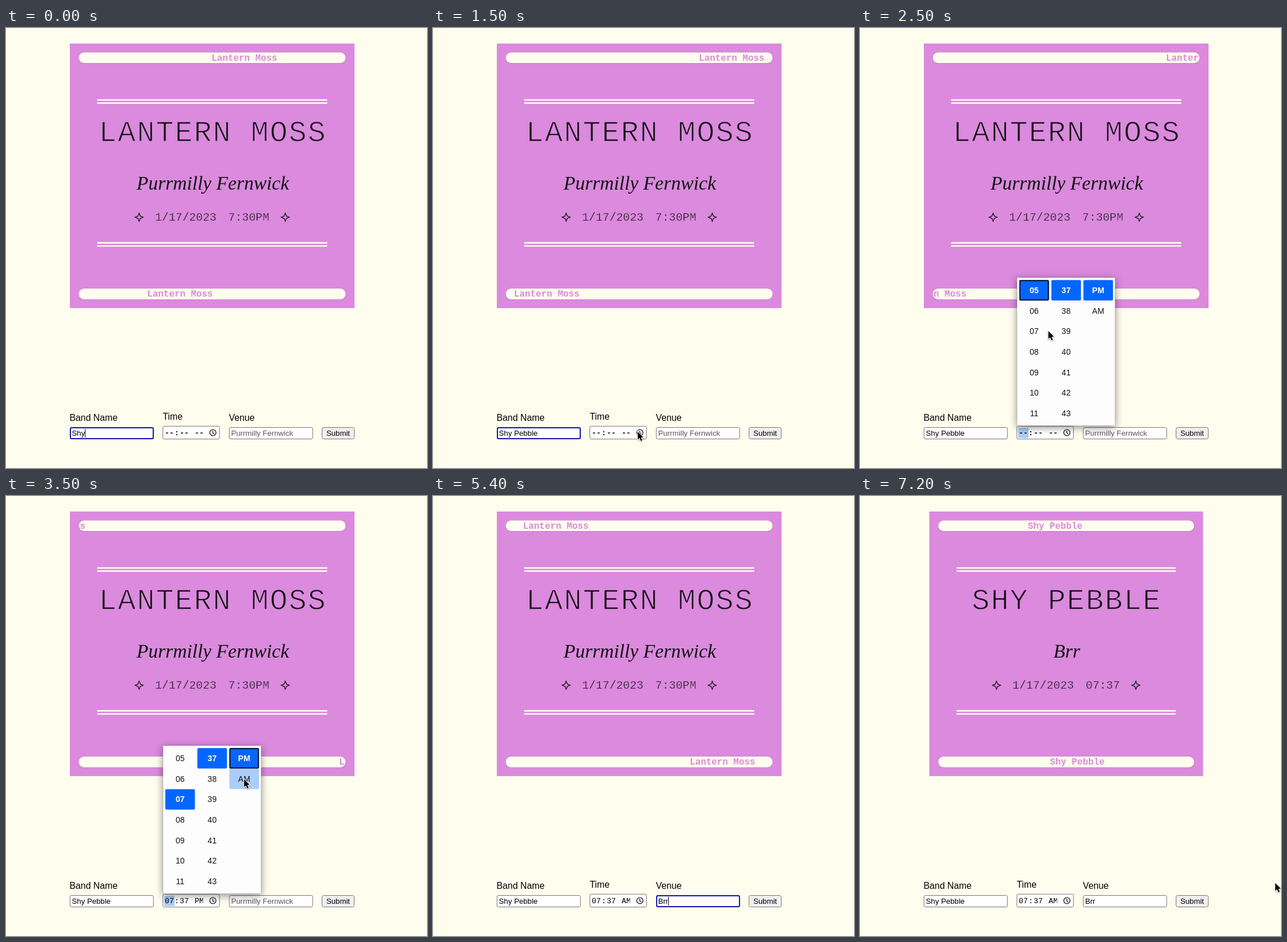
An HTML page with a canvas for the animation above (7.3 s loop, 732 by 765 pixels).

```html
<!DOCTYPE html>
<html lang="en">
<head>
<meta charset="utf-8">
<title>Gig poster form</title>
<style>
  html, body { margin: 0; width: 100%; height: 100%; overflow: hidden; background: #fffdee; }
  canvas { display: block; }
</style>
</head>
<body>
<canvas id="stage" width="732" height="765"></canvas>
<script>
const ctx = document.getElementById('stage').getContext('2d');

const LOOP = 7300, STEP = 100, CENTER = 358.5;
const IVORY = '#fffdee', PLUM = '#db8ade', INK = '#111', GREY = '#767676';
const BLUE = '#0566ff', PALE = '#acccf8', FOCUS = '#1016b0';
const SANS = '"Liberation Sans", Arial, sans-serif';
const MONO = '"Liberation Mono", "Courier New", monospace';
const SCRIPT = '"Liberation Serif", "Times New Roman", serif';

const OLD_BAND = 'Lantern Moss', NEW_BAND = 'Shy Pebble';
const OLD_VENUE = 'Purrmilly Fernwick', NEW_VENUE = 'Brr';

// Moments of the interaction, in ms
const AT = { open: 1800, hour: 2800, meridiem: 3200, am: 3700, close: 4300,
             venue: 4900, press: 6100, submit: 6300 };

const CURSOR = [
  [[1000, 200, 735], [1500, 356, 702], [1800, 358, 703], [2500, 327.5, 527],
   [2800, 306, 529], [2900, 306, 529], [3200, 410, 466], [3500, 414, 492.5],
   [3800, 414, 492.5], [4300, 420, 706], [4600, 423, 709.5], [4800, 423, 709.5]],
  [[5700, 430, 711], [6200, 586, 713.5], [6400, 586, 713.5], [7200, 722, 673]]
];

const mod = (a, n) => ((a % n) + n) % n;

function text(str, x, y, font, color = '#000', align = 'left') {
  ctx.font = font;
  ctx.fillStyle = color;
  ctx.textAlign = align;
  ctx.fillText(str, x, y);
}

// Light type: the card colour trims the edges of the glyphs
function thinText(str, x, y, font, trim, align) {
  text(str, x, y, font, INK, align);
  ctx.strokeStyle = PLUM;
  ctx.lineWidth = trim;
  ctx.lineJoin = 'round';
  ctx.strokeText(str, x, y);
}

function box(x, y, w, h, r, fill, stroke, lineWidth = 1) {
  ctx.beginPath();
  ctx.roundRect(x, y, w, h, r);
  if (fill) {
    ctx.fillStyle = fill;
    ctx.fill();
  }
  if (stroke) {
    ctx.strokeStyle = stroke;
    ctx.lineWidth = lineWidth;
    ctx.stroke();
  }
}

function withShadow(color, blur, dy, draw) {
  ctx.save();
  ctx.shadowColor = color;
  ctx.shadowBlur = blur;
  ctx.shadowOffsetY = dy;
  draw();
  ctx.restore();
}

function cursorAt(t) {
  const path = CURSOR.find(p => t >= p[0][0] && t <= p[p.length - 1][0]);
  if (!path) return null;
  const i = Math.max(1, path.findIndex(k => k[0] >= t));
  const [t0, x0, y0] = path[i - 1], [t1, x1, y1] = path[i];
  const u = (t - t0) / (t1 - t0), e = u * u * (3 - 2 * u);
  return { x: x0 + (x1 - x0) * e, y: y0 + (y1 - y0) * e };
}

function marquee(left, width, y, offset, label) {
  withShadow('rgba(0,0,0,.2)', 1.5, 0.3, () => box(left, y, width, 18.7, 9.35, IVORY));
  ctx.save();
  ctx.beginPath();
  ctx.roundRect(left, y, width, 18.7, 9.35);
  ctx.clip();
  text(label, left + offset, y + 14.1, `bold 15.83px ${MONO}`, PLUM);
  ctx.restore();
}

function doubleRule(x, y, w) {
  ctx.fillStyle = IVORY;
  ctx.fillRect(x, y, w, 2.6);
  ctx.fillRect(x, y + 5.4, w, 2.6);
}

function sparkle(x, y) {
  ctx.beginPath();
  for (let i = 0; i < 8; i++) {
    const r = i % 2 ? 2.9 : 7, a = i * Math.PI / 4;
    ctx.lineTo(x + r * Math.cos(a), y + r * Math.sin(a));
  }
  ctx.closePath();
  ctx.strokeStyle = INK;
  ctx.lineWidth = 1.3;
  ctx.lineJoin = 'miter';
  ctx.stroke();
}

function drawCard(t) {
  const done = t >= AT.submit;
  const band = done ? NEW_BAND : OLD_BAND;
  const width = done ? 476 : 495;
  const left = CENTER - width / 2;
  box(left, 27, width, 460, 0, PLUM);

  const travel = 577.8, lead = 113.8, shift = t * 0.0698;
  marquee(left + 15.5, width - 31, 42.4, mod(231 + shift + lead, travel) - lead, band);
  marquee(left + 15.5, width - 31, 453, mod(119 - shift + lead, travel) - lead, band);

  doubleRule(left + 47.5, 123.8, width - 95);
  doubleRule(left + 47.5, 372.2, width - 95);

  ctx.letterSpacing = '1.8px';
  thinText(band.toUpperCase(), CENTER + 0.9, 196.5, `52px ${MONO}`, 1.5, 'center');
  ctx.letterSpacing = '0px';

  text(done ? NEW_VENUE : OLD_VENUE, CENTER + 1, 280.5, `italic 33.5px ${SCRIPT}`, INK, 'center');

  const date = '1/17/2023', time = done ? '07:37' : '7:30PM';
  const pitch = 11.88, gap = 20.5;
  const total = (date.length + time.length) * pitch + gap;
  const start = CENTER - total / 2;
  const font = `19.8px ${MONO}`;
  thinText(date, start, 335, font, 0.5, 'left');
  thinText(time, start + date.length * pitch + gap, 335, font, 0.5, 'left');
  sparkle(start - 27.7, 329);
  sparkle(start + total + 27.7, 329);
}

function drawInput(x, value, placeholder, focused, caret) {
  if (focused) box(x + 0.7, 695, 144, 19, 2, '#fff', FOCUS, 2);
  else box(x, 694.5, 145, 20, 2.5, '#fff', GREY);
  const font = `13.2px ${SANS}`;
  text(value || placeholder, x + 3.2, 709, font, value ? '#000' : '#585858');
  if (caret) {
    ctx.fillStyle = '#000';
    ctx.fillRect(x + 3.2 + (value ? ctx.measureText(value).width : 0), 697, 1, 15);
  }
}

function drawTimeField(t) {
  const filled = t >= AT.hour;
  box(272.8, 692.3, 98.4, 22.4, 2.5, '#fff', GREY);
  if (t >= AT.open && t < AT.close) {
    ctx.fillStyle = PALE;
    ctx.fillRect(275, 695, 18, 18);
  }
  const parts = filled ? ['07', '37', t >= AT.am ? 'AM' : 'PM'] : ['--', '--', '--'];
  const font = `${filled ? '' : 'bold '}13.2px ${MONO}`;
  ctx.save();
  ctx.beginPath();
  ctx.rect(273, 692, 69.5, 23);
  ctx.clip();
  [276, 302, 328].forEach((x, i) => text(parts[i], x, 708, font));
  text(':', 293, 708, font);
  ctx.restore();

  ctx.strokeStyle = '#222';
  ctx.lineWidth = 1.4;
  ctx.beginPath();
  ctx.arc(359.7, 703.5, 5.4, 0, Math.PI * 2);
  ctx.moveTo(359.5, 700);
  ctx.lineTo(359.5, 704);
  ctx.lineTo(362.3, 705.6);
  ctx.stroke();
}

function drawForm(t) {
  const label = `15.84px ${SANS}`;
  text('Band Name', 110.5, 682.5, label);
  text('Time', 272.5, 680.5, label);
  text('Venue', 387.5, 682.5, label);

  const typed = Math.min(NEW_BAND.length, 3 + Math.floor(t / 125));
  const bandFocus = t < AT.open;
  drawInput(111.3, NEW_BAND.slice(0, typed), '', bandFocus, bandFocus && t < 1400);

  drawTimeField(t);

  const venueFocus = t >= AT.close && t < AT.press;
  const letters = t < AT.venue ? 0 : Math.min(3, 1 + Math.floor((t - AT.venue) / 200));
  const caretOn = venueFocus && t < 5800;
  drawInput(388.2, NEW_VENUE.slice(0, letters), OLD_VENUE, venueFocus, caretOn);

  const pressed = t >= AT.press && t < AT.submit;
  box(549.5, 694.5, 56, 20, 3, pressed ? '#f6f6f6' : '#efefef', GREY);
  text('Submit', 577.5, 709, `13.2px ${SANS}`, '#000', 'center');
}

function drawPicker(t, cursor) {
  withShadow('rgba(0,0,0,.45)', 14, 3, () => box(273, 434, 170.5, 257.5, 1, '#fdfdfd'));
  box(273, 434, 170.5, 257.5, 1, null, 'rgba(0,0,0,.15)');

  const columns = [
    { start: 5, count: 7, selected: t >= AT.hour ? 2 : 0 },
    { start: 37, count: 7, selected: 0 },
    { names: ['PM', 'AM'], count: 2, selected: t >= AT.am ? 1 : 0 }
  ];
  const active = t >= AT.meridiem ? 2 : 0;
  columns.forEach((col, c) => {
    const x = 277 + c * 55.7;
    for (let row = 0; row < col.count; row++) {
      const y = 438.3 + row * 35.67;
      const selected = row === col.selected;
      const hover = cursor && cursor.x > x && cursor.x < x + 50 &&
                    cursor.y > y && cursor.y < y + 35.5;
      if (selected) box(x, y, 51.5, 35.5, 2, BLUE);
      else if (hover) box(x, y, 51.5, 35.5, 2, PALE);
      if (selected && c === active) box(x + 1, y + 1, 49.5, 33.5, 1, null, '#0a1430', 2);
      const name = col.names ? col.names[row] : String(col.start + row).padStart(2, '0');
      text(name, x + 25.7, y + 22.7, `${selected ? 'bold ' : ''}14px ${SANS}`,
           selected ? '#fff' : '#111', 'center');
    }
  });
}

function drawCursor({ x, y }) {
  const outline = [[0, 0], [0, 13.5], [3.1, 10.7], [5.4, 16], [7.8, 15], [5.5, 9.9], [9.6, 9.5]];
  withShadow('rgba(0,0,0,.35)', 2, 1, () => {
    ctx.beginPath();
    outline.forEach(([dx, dy]) => ctx.lineTo(x + dx, y + dy));
    ctx.closePath();
    ctx.lineJoin = 'miter';
    ctx.strokeStyle = '#fff';
    ctx.lineWidth = 2;
    ctx.stroke();
  });
  ctx.fillStyle = '#000';
  ctx.fill();
}

function render(now) {
  const t = Math.floor(mod(now, LOOP) / STEP) * STEP;
  const cursor = cursorAt(t);
  ctx.fillStyle = IVORY;
  ctx.fillRect(0, 0, 732, 765);
  drawCard(t);
  drawForm(t);
  if (t >= AT.open && t < AT.close) drawPicker(t, cursor);
  if (cursor) drawCursor(cursor);
}

let begin = null;
function tick(now) {
  if (begin === null) begin = now;
  render(now - begin);
  requestAnimationFrame(tick);
}
render(0);
requestAnimationFrame(tick);
</script>
</body>
</html>
```
